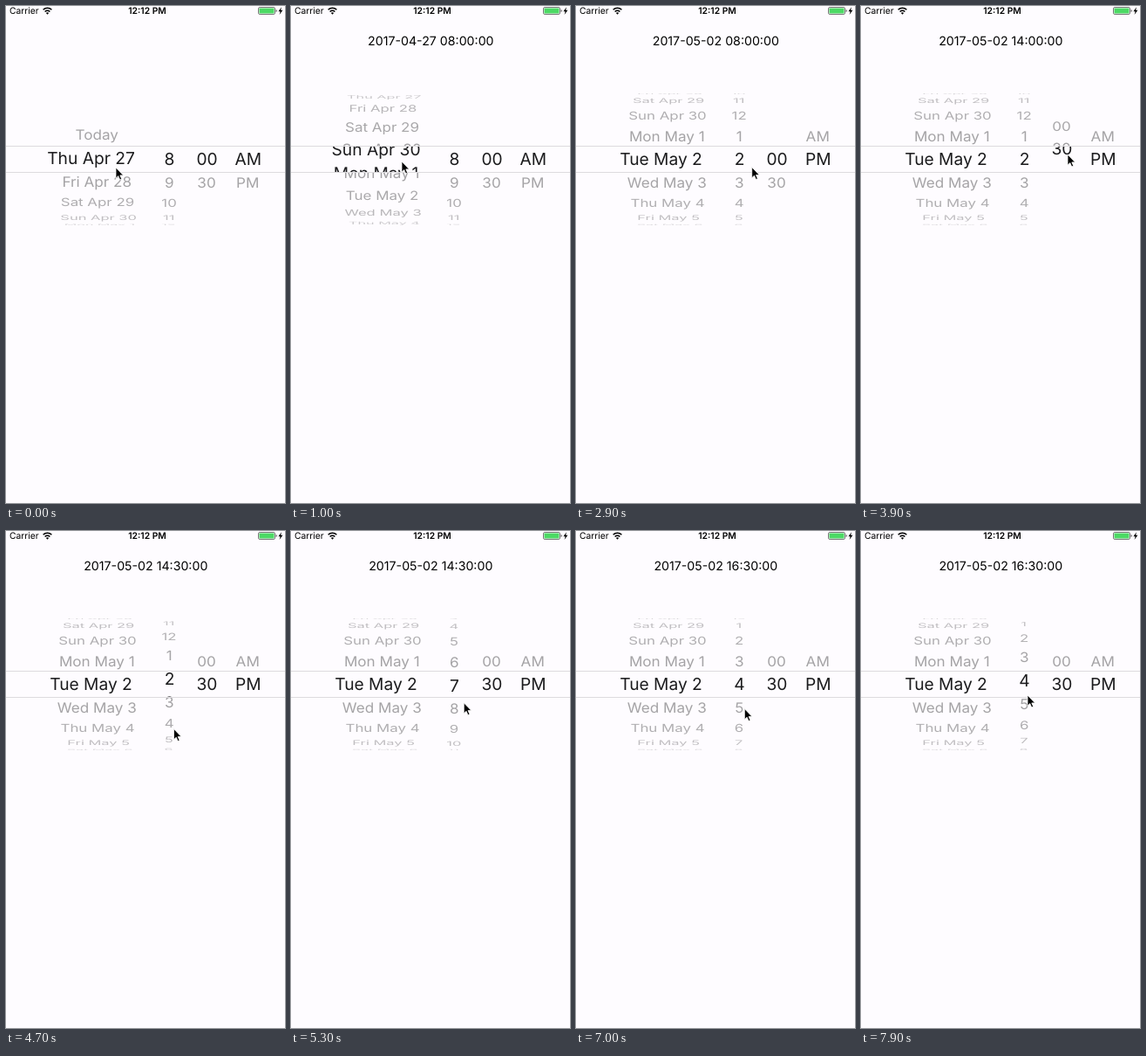
An HTML page that plays this animation: 320x569 px, repeating every 8000 ms.

```html
<!DOCTYPE html>
<html lang="en">
<head>
<meta charset="utf-8">
<title>Date picker</title>
<style>
  html, body { margin: 0; width: 100%; height: 100%; overflow: hidden; background: #fefcff; }
  svg { display: block; width: 320px; height: 569px; }
  text { font-family: Inter, "Liberation Sans", sans-serif; text-rendering: geometricPrecision; white-space: pre; }
  .row { font-size: 19.2px; text-anchor: middle; }
  .dark .row { fill: #1b1b1d; }
  .grey .row { fill: #000; }
</style>
</head>
<body>
<svg viewBox="0 0 320 569">
  <defs>
    <clipPath id="band"><rect y="161" width="320" height="29"/></clipPath>
    <clipPath id="rest"><rect y="100" width="320" height="60"/><rect y="191" width="320" height="60"/></clipPath>
  </defs>
  <rect width="320" height="569" fill="#fefcff"/>

  <text x="4" y="9.3" font-size="10.3">Carrier</text>
  <g fill="none" stroke="#000" stroke-width="1.5">
    <path d="M42.6 4.3a7 7 0 0 1 9.8 0M44.6 6.5a4.2 4.2 0 0 1 5.8 0"/>
    <path d="M47.5 9.7l-1.6-1.8a2.3 2.3 0 0 1 3.2 0z" fill="#000" stroke="none"/>
  </g>
  <text x="162" y="9.3" font-size="10.3" font-weight="600" text-anchor="middle">12:12 PM</text>
  <rect x="289.5" y="1.5" width="19" height="8" rx="1.6" fill="#fefcff" stroke="#555" stroke-width=".8"/>
  <rect x="290.5" y="2.5" width="17" height="6" rx=".7" fill="#4cd964"/>
  <path d="M309.6 4v3q1.2-.3 1.2-1.5t-1.2-1.5z" fill="#555"/>
  <path d="M316 1.2l-3.6 5h2.2l-1 3.8 3.8-5.2h-2.3z"/>

  <text id="stamp" x="160.3" y="44.7" font-size="14.2" text-anchor="middle"></text>
  <g id="grey" class="grey" clip-path="url(#rest)"></g>
  <g id="dark" class="dark" clip-path="url(#band)"></g>
  <path d="M0 160.5H320M0 190.5H320" stroke="#dddbde"/>
  <path id="cursor" d="M0 0V12.2L2.8 9.6L4.7 14L6.7 13.1L4.8 8.9H8.6Z" stroke="#fff" stroke-width=".8" stroke-linejoin="round"/>
</svg>
<script>
const LOOP = 8000, FRAME = 100, REPORT_DELAY = 150;
const MID = 175.5, RADIUS = 75.5, STEP = 0.363;
const CAP = 0.364 * 19.2;
const DAYS = ["Sun", "Mon", "Tue", "Wed", "Thu", "Fri", "Sat"];
const $ = id => document.getElementById(id);
const pad = n => String(n).padStart(2, "0");

function ease(p) {
  p = Math.min(1, Math.max(0, p));
  return p * p * (3 - 2 * p);
}

// Moves are [start, end, target]; k picks a coordinate of an array target.
function follow(from, moves, t, k) {
  return moves.reduce((v, [t0, t1, to]) =>
    v + ((k === undefined ? to : to[k]) - v) * ease((t - t0) / (t1 - t0)), from);
}

// April 26 is day 0, a Wednesday.
function dateOf(i) {
  const day = 26 + i;
  return day > 30 ? [5, day - 30] : [4, day];
}

function dayLabel(i) {
  if (i === 0) return "Today";
  const [month, day] = dateOf(i);
  return `${DAYS[(3 + i) % 7]} ${month === 5 ? "May" : "Apr"} ${day}`;
}

const date = { x: 97.5, edge: 104, bend: 4, label: dayLabel, count: 99,
  from: 1.04, moves: [[0, 50, 1], [700, 1180, 6]] };
const hour = { x: 187.5, edge: 187.4, bend: -1.2, label: i => String((i + 7) % 12 + 1), count: 99,
  from: 0, moves: [[2100, 2850, 6], [4600, 5340, 11], [5930, 6600, 20], [7700, 7900, 20.16]] };
const minute = { x: 230.5, edge: 230, bend: 0, label: i => pad(30 * i), count: 2,
  from: 0, moves: [[3500, 3900, 1.46], [3900, 4100, 1]] };
const half = { x: 277.7, edge: 277.2, bend: 0, label: i => i ? "PM" : "AM", count: 2,
  from: 0, moves: [[2500, 2850, 1]] };
const columns = [date, hour, minute, half];

const pointer = { from: [126, 185], moves: [
  [0, 200, [126, 201]], [300, 600, [126, 216]], [700, 1000, [127, 178]],
  [1300, 2000, [188, 223]], [2100, 2500, [189, 176]], [2600, 3500, [238, 209]],
  [3500, 3900, [237, 170]], [4200, 4600, [192, 230]], [4600, 5200, [198, 184]],
  [5200, 5500, [199, 233]], [5800, 6300, [193, 183]], [6700, 7500, [194, 248]],
  [7600, 7900, [191, 188]]
] };

function pool(parent, n) {
  return Array.from({ length: n }, () => {
    const el = document.createElementNS("http://www.w3.org/2000/svg", "text");
    el.setAttribute("class", "row");
    return parent.appendChild(el);
  });
}

for (const c of columns) {
  c.grey = pool($("grey"), 11);
  c.dark = pool($("dark"), 5);
}

function drawWheel(c, rows, pos, dark) {
  const first = Math.round(pos) - (rows.length >> 1);
  rows.forEach((el, n) => {
    const i = first + n, angle = (i - pos) * STEP, depth = Math.cos(angle);
    const shown = i >= 0 && i < c.count && depth > 0.03;
    el.textContent = shown ? c.label(i) : "";
    if (!shown) return;
    const scale = dark ? 1 : 0.895 - 0.07 * (1 - depth);
    const x = dark ? c.x : c.edge + c.bend * (1 - depth);
    const y = MID + RADIUS * Math.sin(angle);
    el.setAttribute("transform", `translate(${x} ${y}) scale(${scale} ${scale * depth}) translate(0 ${CAP})`);
    if (!dark) el.setAttribute("fill-opacity", 0.13 + 0.24 * depth);
  });
}

// The row a wheel last came to rest on.
function picked(c, t) {
  const done = c.moves.filter(([, end, to]) => Number.isInteger(to) && end + REPORT_DELAY <= t);
  return done.length ? done.pop()[2] : c.from;
}

function stampText(t) {
  const day = picked(date, t);
  if (!Number.isInteger(day)) return "";
  const hours = (picked(hour, t) + 8) % 12 + 12 * picked(half, t);
  return `2017-${dateOf(day).map(pad).join("-")} ${pad(hours)}:${pad(30 * picked(minute, t))}:00`;
}

function draw(t) {
  for (const c of columns) {
    const pos = follow(c.from, c.moves, t);
    drawWheel(c, c.grey, pos, false);
    drawWheel(c, c.dark, pos, true);
  }
  $("stamp").textContent = stampText(t);
  const [x, y] = pointer.from.map((v, k) => follow(v, pointer.moves, t, k));
  $("cursor").setAttribute("transform", `translate(${x} ${y})`);
}

const start = performance.now();
let last = -1;
function tick() {
  const t = Math.floor((performance.now() - start) % LOOP / FRAME) * FRAME;
  if (t !== last) draw(last = t);
  requestAnimationFrame(tick);
}
tick();
</script>
</body>
</html>
```
